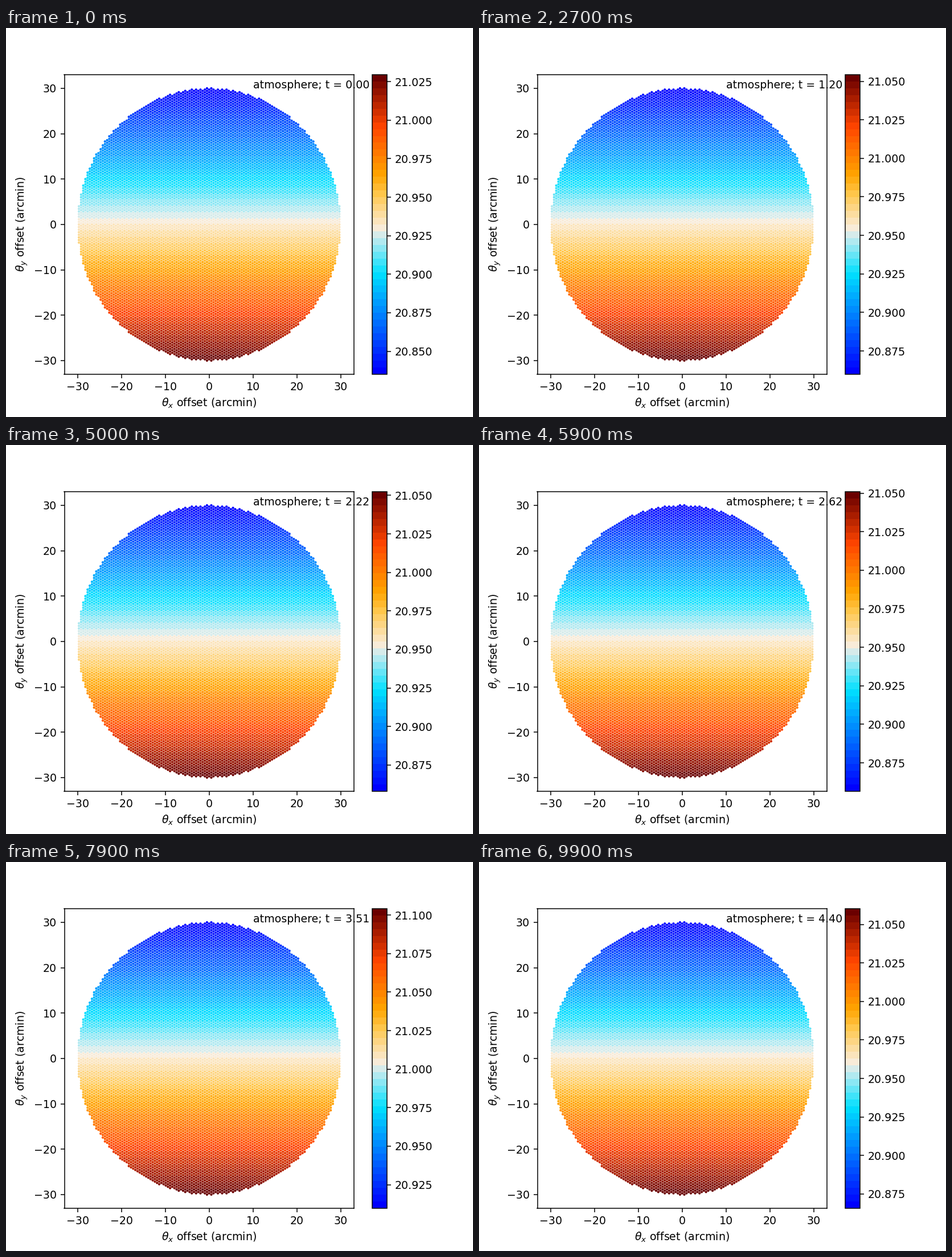
Animation, 820 px wide and 683 px high, one loop 10000 ms. Source, as a matplotlib script:

```python
import numpy as np
import matplotlib.pyplot as plt
from matplotlib.animation import FuncAnimation
from matplotlib.cm import ScalarMappable
from matplotlib.colors import LinearSegmentedColormap, Normalize
from matplotlib.patches import PathPatch
from matplotlib.path import Path
from matplotlib.ticker import MultipleLocator

W, H, DPI = 820, 683, 820 / 6
FRAMES, INTERVAL = 100, 100
DT = 2 / 45            # simulated seconds per frame
RADIUS = 30            # field radius, arcmin
PITCH = 0.5713         # hexagonal lattice spacing, arcmin
LEVELS = 44
SPAN = 0.1944          # full range of the colour scale

CMAP = LinearSegmentedColormap.from_list("field", [
    (0, "blue"), (1 / 6, "#0070ff"), (1 / 3, "#00e0ff"), (0.46, "#cfebee"),
    (0.49, "antiquewhite"), (0.6, "#ffc850"), (2 / 3, "orange"),
    (5 / 6, "orangered"), (1, "#6b0000")], N=LEVELS)

# Drift of the mean value: (frame, value above 20.9)
KNOTS = np.array([
    (0, .0323), (5, .0472), (12, .0294), (22, .0458), (27, .0571),
    (33, .0620), (37, .0653), (41, .0623), (44, .0585), (50, .0552),
    (55, .0543), (58, .0536), (59, .0538), (66, .0700), (71, .0860),
    (77, .1032), (82, .1100), (88, .1049), (99, .0630)])


def monotone_curve(knots, x):
    """Cubic Hermite curve that does not overshoot its knots."""
    kx, ky = knots.T
    h = np.diff(kx)
    slope = np.diff(ky) / h
    a, b = slope[:-1], slope[1:]
    tangent = np.concatenate([
        slope[:1], np.where(a * b > 0, 2 * a * b / (a + b), 0), slope[-1:]])
    i = np.clip(np.searchsorted(kx, x, side="right") - 1, 0, len(h) - 1)
    u = (x - kx[i]) / h[i]
    return (ky[i] * (1 + 2 * u) * (1 - u) ** 2
            + ky[i + 1] * u ** 2 * (3 - 2 * u)
            + h[i] * u * (1 - u) * (tangent[i] * (1 - u) - tangent[i + 1] * u))


def hex_lattice():
    col, row = np.meshgrid(np.arange(-61, 62), np.arange(-54, 55))
    x = col * PITCH * np.sqrt(3) / 2
    y = (row + col % 2 / 2) * PITCH
    inside = np.hypot(x, y) <= RADIUS
    return x[inside], y[inside]


def dots_path(x, y, rx, ry, sides=16):
    """One compound path holding a small disc at every point."""
    a = np.linspace(0, 2 * np.pi, sides + 1)
    ring = np.column_stack([rx * np.cos(a), ry * np.sin(a)])
    verts = np.column_stack([x, y])[:, None, :] + ring
    codes = [Path.MOVETO] + [Path.LINETO] * (sides - 1) + [Path.CLOSEPOLY]
    return Path(verts.reshape(-1, 2), np.tile(codes, len(x)))


mean = 20.9 + monotone_curve(KNOTS, np.arange(FRAMES))

fig, ax = plt.subplots(figsize=(W / DPI, H / DPI), dpi=DPI)
scale = ScalarMappable(Normalize(mean[0] - SPAN / 2, mean[0] + SPAN / 2), CMAP)
fig.colorbar(scale, ax=ax, ticks=MultipleLocator(0.025), format="%.3f")

ax.set(xlim=(-33, 33), ylim=(-33, 33),
       xlabel=r"$\theta_x$ offset (arcmin)",
       ylabel=r"$\theta_y$ offset (arcmin)")
ax.xaxis.set_major_locator(MultipleLocator(10))
ax.yaxis.set_major_locator(MultipleLocator(10))

x, y = hex_lattice()
level = np.clip((0.5 - y / (2 * RADIUS)) * LEVELS, 0, LEVELS - 1).astype(int)
box = ax.get_position()
dot = 2.12             # dot radius in pixels
rx, ry = dot * 66 / (box.width * W), dot * 66 / (box.height * H)
for k in range(LEVELS):
    pick = level == k
    ax.add_patch(PathPatch(dots_path(x[pick], y[pick], rx, ry),
                           facecolor=CMAP(k), linewidth=0))

label = ax.text(10, 30, "")


def update(n):
    label.set_text(f"atmosphere; t = {n * DT:.2f}")
    scale.set_clim(mean[n] - SPAN / 2, mean[n] + SPAN / 2)
    return [label]


anim = FuncAnimation(fig, update, frames=FRAMES, interval=INTERVAL,
                     repeat=True, repeat_delay=0)
plt.show()
```
